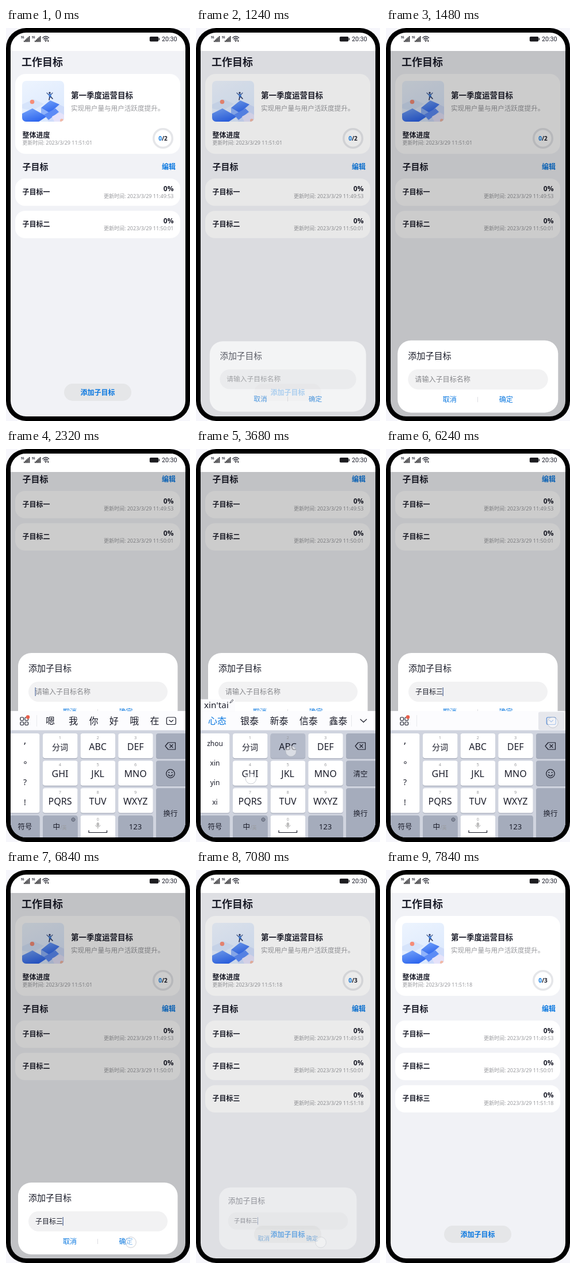
Recreate the animation shown at these times as an HTML page. Size 320 by 684 pixels, loop 8000 ms.

```html
<!DOCTYPE html>
<html lang="zh-CN">
<head>
<meta charset="utf-8">
<title>添加子目标</title>
<style>
html, body { margin: 0; width: 100%; height: 100%; overflow: hidden; background: #f6f6fb; }
svg { display: block; width: 100%; height: 100%; }
text { font-family: "Noto Sans", "Noto Sans CJK SC", "Noto Sans CJK", sans-serif; fill: #1b1d2a; white-space: pre; }
.b { font-weight: 600; }
.d { font-weight: 500; }
.m { text-anchor: middle; }
.e { text-anchor: end; }
.blue { fill: #0a78e0; }
.grey { fill: #999a9e; }
.roboto { font-family: Roboto, sans-serif; }
.line { fill: none; stroke: #1b1d2a; stroke-width: 1.2; stroke-linecap: round; stroke-linejoin: round; }
</style>
</head>
<body>
<svg id="stage" viewBox="0 0 320 684"></svg>
<script>
const LOOP = 8000, LIFT = 189, ADDED = 6930;
const $ = id => document.getElementById(id);
const text = (x, y, size, str, cls = '', id = '') =>
  `<text x="${x}" y="${y}" font-size="${size}" class="${cls}" id="${id}">${str}</text>`;
const rect = (x, y, w, h, r, fill, more = '') =>
  `<rect x="${x}" y="${y}" width="${w}" height="${h}" rx="${r}" fill="${fill}" ${more}/>`;
const circle = (x, y, r, fill, more = '') => `<circle cx="${x}" cy="${y}" r="${r}" fill="${fill}" ${more}/>`;
const path = (d, fill, more = '') => `<path d="${d}" fill="${fill}" ${more}/>`;
const line = (d, more = '') => `<path class="line" d="${d}" ${more}/>`;
const group = (id, body, more = '') => `<g id="${id}" ${more}>${body}</g>`;
const gradient = (id, from, to) => `<linearGradient id="${id}" x1="0" y1="0" x2=".5" y2="1">
  <stop stop-color="${from}"/><stop offset="1" stop-color="${to}"/></linearGradient>`;
const stamp = time => `更新时间: 2023/3/29 ${time}`;
const clamp = v => Math.max(0, Math.min(1, v));
const ramp = (t, a, b) => clamp((t - a) / (b - a));
const easeOut = p => 1 - (1 - p) ** 3;

// Page
function picture() {
  return `<g clip-path="url(#thumb)">` + rect(28, 92, 73, 71, 0, 'url(#sky)') +
    path('M28 133l20-9 18 8-20 12-18-4z', '#d6e4fb') +
    path('M60 140l17-14 24 11v26H74z', '#cfdcfa') +
    path('M61 139l16-13 16 7-17 15z', 'url(#blue)') +
    path('M61 139l15 9v9l-15-8z', '#8fb2fa') +
    path('M28 149l18-9 25 14-14 9H28z', 'url(#blue)') +
    path('M66 151l20-11 6 6-18 14z', '#5c8bf6') +
    path('M80 154l14-7 7 4v12H84z', '#e6e3fa') +
    circle(45.5, 128.5, 3.8, '#f58d78') + circle(97, 161, 3, '#f3b9a5') +
    circle(76, 113, 1.7, '#2c3560') +
    path('M74 115l4 0 1 5-4 1z', '#3d7fe0') +
    line('M74 116l-3-3M78 116l3-3', 'style="stroke:#3b568f"') +
    line('M76 120l-1 5M78 120l3 3', 'style="stroke:#26305a;stroke-width:1.6"') + '</g>';
}
function row(i, name, time) {
  const y = 262 + i * 56.3;
  return group('row' + i, rect(16, y, 287, 47.5, 17, '#fff') +
    text(28.5, y + 27.5, 12, name, 'b') + text(291.5, y + 21.5, 12, '0%', 'b e') +
    text(291.5, y + 34, 9, stamp(time), 'grey e'));
}
const page = rect(8, 40, 304, 860, 0, '#f1f2f6') +
  text(27, 65.5, 18, '工作目标', 'b') +
  rect(16, 80, 287, 139, 18, '#fff') + picture() +
  text(113, 121.5, 13.5, '第一季度运营目标', 'b') +
  text(113, 144.3, 11.6, '实现用户量与用户活跃度提升。', 'grey') +
  text(28.5, 190.5, 12, '整体进度', 'b') + text(28.5, 203, 9, '', 'grey', 'updated') +
  circle(273, 192, 16.3, 'none', 'stroke="#e5e6e9" stroke-width="3.6"') +
  `<text x="273" y="195.7" font-size="10" class="m b"><tspan class="blue">0</tspan>/<tspan id="total"></tspan></text>` +
  text(28.5, 247.3, 15, '子目标', 'b') + text(295, 246.3, 12, '编辑', 'b blue e') +
  row(0, '子目标一', '11:49:53') + row(1, '子目标二', '11:50:01') + row(2, '子目标三', '11:51:18') +
  rect(101, 619, 117, 30, 15, '#e5e6e8') + text(159.5, 638.5, 12, '添加子目标', 'b blue m');

const dialog = rect(21, 544, 277.5, 125, 23, '#fff') +
  text(39, 575.7, 15, '添加子目标', 'd') +
  rect(39, 594, 242, 35, 17.5, '#f2f2f3') +
  text(51, 615.5, 12, '', '', 'field') +
  rect(50.6, 604, 1, 15, 0, '#2a4a86', 'id="caret"') +
  text(111, 650.8, 12, '取消', 'd blue m') + text(208.5, 650.8, 12, '确定', 'd blue m') +
  rect(159, 642, 1, 9, 0, '#dcdce0');

// Keyboard
const DARK = '#a5acbc', COLS = [64, 129.6, 195.2], ROWS = [495, 542.6, 590.2, 637.8];
const keyX = n => COLS[(n - 1) % 3], keyY = n => ROWS[Math.floor((n - 1) / 3)];
const cap = (x, y, w, h, fill, id = '') =>
  rect(x, y + 1, w, h, 4, '#9aa0b0') + rect(x, y, w, h, 4, fill, `id="${id}"`);
const LABELS = ['分词', 'ABC', 'DEF', 'GHI', 'JKL', 'MNO', 'PQRS', 'TUV', 'WXYZ'];
const letters = LABELS.map((label, i) => {
  const n = i + 1, x = keyX(n), y = keyY(n);
  return cap(x, y, 60.5, 43.3, '#fff', 'key' + n) + text(x + 30, y + 9.8, 7.5, n, 'grey m') +
    text(x + 30, y + 28.5, n > 1 ? 16 : 14, label, 'm');
}).join('');
const keyboard = rect(8, 456, 304, 34, 0, '#fcfcfe') + rect(8, 489.5, 304, 190, 0, '#d0d4df') +
  cap(6, 495, 52.5, 138.5, '#fff') + letters +
  cap(261, 495, 55, 43.3, DARK) + cap(261, 542.6, 55, 43.3, DARK) + cap(261, 590.2, 55, 92, DARK) +
  cap(6, 637.8, 52.5, 44, DARK) + cap(64, 637.8, 60.5, 44, DARK) +
  cap(129.6, 637.8, 60.5, 44, '#fff') + cap(195.2, 637.8, 60.5, 44, DARK) +
  line('M277 517l5-6h12.5v12H282zM285 514.500l5 5M290 514.500l-5 5') +
  text(286, 638.5, 12.5, '换行', 'm') + text(33, 661.8, 12.5, '符号', 'm') +
  text(81.5, 661.8, 12.5, '中') + text(94.5, 662, 8, '/英', 'grey') +
  circle(117, 645, 3, 'none', 'stroke="#555b6b"') + line('M114 645h6M117 642v6', 'style="stroke:#555b6b;stroke-width:.7"') +
  text(159.700, 647, 7, '0', 'grey m') + rect(157.5, 650, 4.5, 7, 2.2, '#bbb') +
  line('M155.500 655q4.300 6 8.500 0M159.700 658.500v2', 'style="stroke:#bbb"') + line('M144 664v3.500h31.500v-3.500') +
  text(225, 661.8, 13, '123', 'm') + group('input', '');

$('stage').innerHTML = `<defs>${gradient('sky', '#edf4fe', '#dce9fd')}${gradient('blue', '#79a7fb', '#2f67ee')}
  <clipPath id="screen">${rect(8, 8, 304, 668, 27, '#fff')}</clipPath>
  <clipPath id="thumb">${rect(28, 92, 73, 71, 7, '#fff')}</clipPath></defs>` +
  rect(0, 0, 320, 684, 35, '#000') +
  `<g clip-path="url(#screen)">` + group('page', page) + rect(8, 8, 304, 668, 0, '#000', 'id="dim"') +
  group('dialog', dialog) + group('keyboard', keyboard) + rect(8, 8, 304, 32, 0, '#fff') +
  [26, 45].map(x => text(x, 18, 4.5, '5G', 'b roboto') + [0, 1, 2, 3, 4].map(i =>
    rect(x + 5 + i * 2.2, 22 - i * 2, 1.5, 2.3 + i * 2, 0, '#1b1b1f')).join('')).join('') +
  line('M63.800 17q5.400-5 10.800 0M65.600 19.200q3.600-3.400 7.200 0M67.300 21.200q1.900-1.700 3.800 0') +
  circle(69.2, 23, 1, '#1b1b1f') + rect(72.500, 21, 1.500, 3, 0, '#1b1b1f') +
  rect(249.8, 15, 15.4, 8.6, 1.8, '#1b1b1f') + rect(265.8, 17.3, 1.3, 4, .6, '#1b1b1f') +
  text(271, 22.8, 10.7, '20:30', 'roboto') + group('touches', '') + '</g>';

// Input states: start time, pinyin, candidates, committed text
const FIRST = '子目标', ALL = '子目标三';
const STATES = [
  [0, '', '嗯 我 你 好 哦 在', ''],
  [3000, 'w', '我 在 这 要 一', ''],
  [3130, 'xi', '系 西 洗 喜 一', ''],
  [3260, 'xin', '新 心 信 因 音', ''],
  [3390, "zi'mu", '字母 字幕 子目 姓牟', ''],
  [3520, "xin'ta", '心塔 新塔 字母啊 信他', ''],
  [3640, "xin'tai", '心态 银泰 新泰 信泰 鑫泰', ''],
  [3760, "zi'mu'bia", '子目标 字母表 字幕', ''],
  [3890, "zi'mu'biao", '子目标 字母表 字幕', ''],
  [4340, '', '', FIRST],
  [4640, 's', '是 去 让 上 人', FIRST],
  [4860, 'pa', '怕 爬 帕 撒 洒', FIRST],
  [5020, 'san', '三 散 伞 然 盘', FIRST],
  [5230, '', '', ALL]
];
// Key presses: time, key
const PRESSES = [[2900, 9], [3030, 4], [3160, 6], [3290, 8], [3420, 2], [3540, 4], [3660, 2], [3790, 6],
  [4560, 7], [4760, 2], [4920, 6]];
// Touch dots: time, x, y, length
const TOUCHES = [[1040, 160, 634, 200], [2010, 110, 611, 200], [4240, 44, 473, 250], [5130, 30, 473, 250],
  [6130, 290, 476, 230], [6830, 217, 648, 300],
  ...PRESSES.map(([at, n]) => [at, keyX(n) + (n === 2 ? 35.5 : 31.5), keyY(n) + 31, 250])];

function inputView([, pinyin, words], pressed) {
  let x = pinyin ? 21 : 69, out = '';
  if (words) words.split(' ').forEach((word, i) => {
    out += text(x, 479, 16, word, pinyin && !i ? 'blue' : '');
    x += word.length * 16 + (i ? 19.4 : 24);
  });
  if (pinyin) {
    const side = words[0] === '心' || pinyin.length > 3 ? 'zhou xin yin xi' : pinyin === 'san' ? 'san pan ran sao' : pinyin[0] < 't' ? 'p q r s' : 'w x y z';
    out += side.split(' ').map((s, i) => text(33, 516.5 + i * 34.3, 12, s, 'm')).join('') +
      rect(8, 435.500, 60, 21, 0, '#fcfcfe', 'id="tab"') + text(14, 450.5, 15.3, pinyin, '', 'pinyin') +
      line('M0 0l3.600-4 1.500 1.300-3.600 4-2 .6z', 'id="pencil" style="stroke-width:.8"') +
      rect(270, 463, .8, 20, 0, '#e0e1e6') + line('M286 470.500l5.300 5 5.300-5') +
      text(286, 569.5, 12.5, '清空', 'm');
  } else {
    const tint = pressed ? 'style="stroke:#5b8fd8"' : '';
    out += text(33, 513, 17, ',', 'm') + circle(33.5, 545.8, 1.9, 'none', 'stroke="#1b1d2a"') +
      text(33, 585, 14, '?', 'm') + text(33, 620, 14, '!', 'm') +
      [[25, 467], [33, 467], [25, 475], [33, 475]].map(([a, b]) => rect(a, b, 5.5, 5.5, 1.2, 'none', 'class="line"')).join('') +
      circle(38, 466.5, 3.2, '#e8604c') + rect(53, 463, .8, 20, 0, '#e4e5ea') +
      (pressed ? rect(265, 457.5, 45, 31.5, 3, '#e6e7ec') : '') +
      rect(279.3, 467, 16, 12.5, 2.5, 'none', 'class="line" ' + tint) + line('M284 472l3.300 3 3.300-3', tint) +
      circle(286, 565, 7.3, 'none', 'class="line"') + circle(283.4, 563, 1, '#1b1d2a') + circle(288.6, 563, 1, '#1b1d2a') +
      line('M282.300 567q3.700 4 7.400 0');
  }
  $('input').innerHTML = out;
  if (pinyin) {
    const len = $('pinyin').getComputedTextLength();
    $('tab').setAttribute('width', len + 17);
    $('pencil').setAttribute('transform', `translate(${17 + len} 440)`);
  }
}

let shown = '';
function draw(t) {
  const lift = easeOut(ramp(t, 2060, 2300)) * (1 - easeOut(ramp(t, 6260, 6360)));
  const enter = ramp(t, 1080, 1440), leave = ramp(t, ADDED, 7180), added = t >= ADDED;
  const scale = .85 + .156 * easeOut(enter) - .006 * ramp(t, 1500, 1840) - .228 * leave;
  const state = STATES.findLast(s => s[0] <= t);
  const pressed = t >= 6130 && t < 6360;
  const set = (id, name, value) => $(id).setAttribute(name, value);

  set('page', 'transform', `translate(0 ${-LIFT * lift})`);
  set('dim', 'opacity', .2 * enter * (1 - leave));
  set('dialog', 'opacity', clamp(enter * 1.5) * (1 - leave));
  set('dialog', 'transform', `translate(159.800 ${606.5 - LIFT * lift}) scale(${scale}) translate(-159.800 -606.500)`);
  set('keyboard', 'transform', `translate(0 ${245 * (1 - lift)})`);
  set('row2', 'visibility', added ? 'visible' : 'hidden');
  $('total').textContent = added ? 3 : 2;
  $('updated').textContent = stamp(added ? '11:51:18' : '11:51:01');

  const value = state[3];
  $('field').textContent = value || '请输入子目标名称';
  $('field').style.fill = value ? '#1b1d2a' : '#85868a';
  set('caret', 'x', 50.6 + value.length * 12);
  const blink = t >= 6200 || (t - 2200) % 1000 < 500;
  set('caret', 'opacity', t > 2080 && !state[1] && blink ? 1 : 0);

  const key = state[0] + '/' + pressed;
  if (key !== shown) inputView(state, pressed);
  shown = key;
  for (let n = 1; n < 10; n++) {
    const down = PRESSES.some(([at, k]) => k === n && t >= at && t < at + 100);
    set('key' + n, 'fill', down ? '#b5bbca' : '#fff');
  }
  $('touches').innerHTML = TOUCHES.filter(([at, , , len]) => t >= at && t < at + len)
    .map(([at, x, y, len]) => circle(x, y, 9.3, '#fff',
      `fill-opacity=".5" stroke="#a9adb8" stroke-opacity=".6" opacity="${1 - ramp(t, at + len * .6, at + len * 1.1)}"`)).join('');
}
function tick() {
  draw(performance.now() % LOOP);
  requestAnimationFrame(tick);
}
tick();
</script>
</body>
</html>
```
